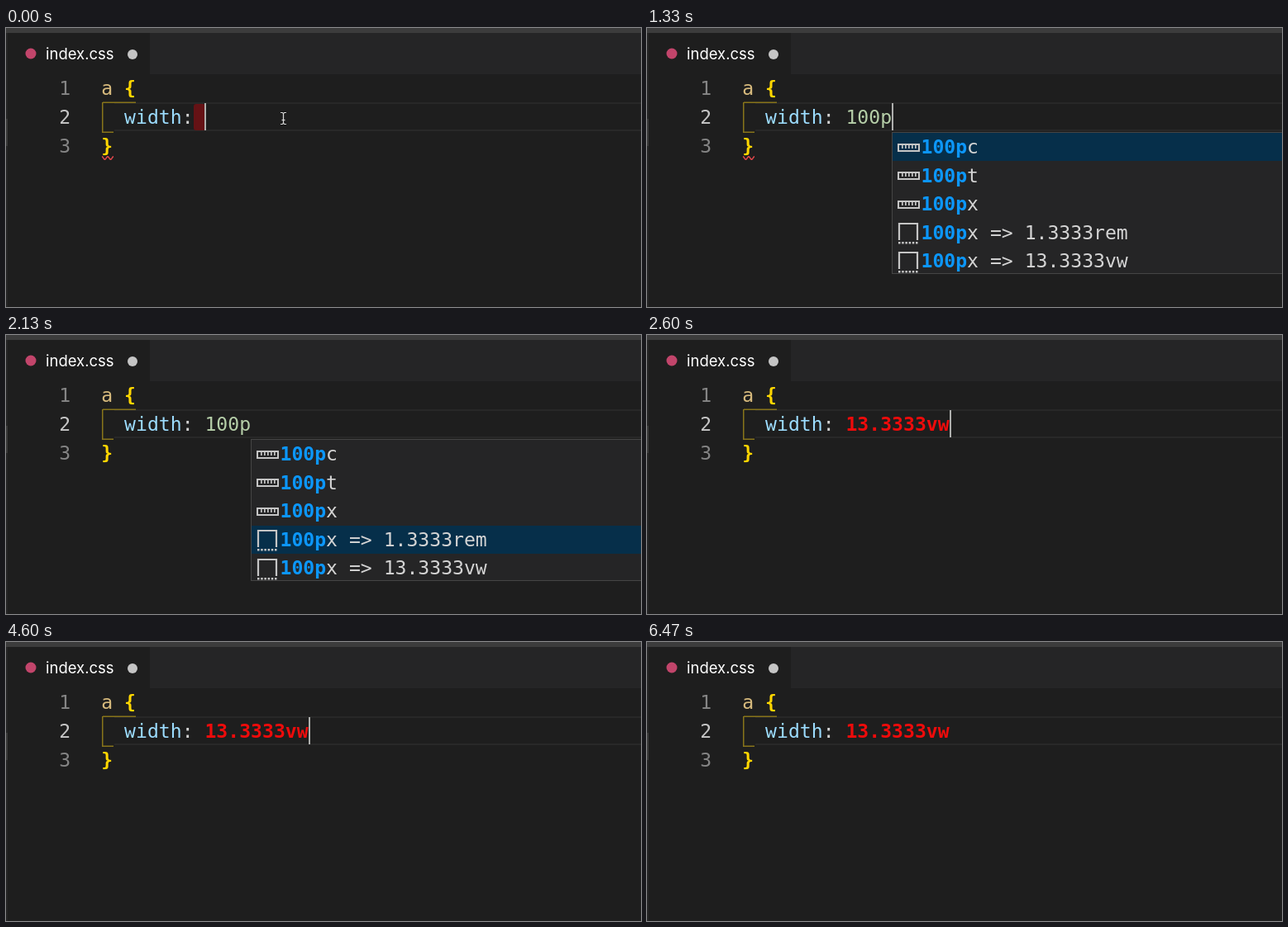
Write an HTML page with a canvas that moves like this. It is 768x338 px and loops after 6790 ms.

```html
<!DOCTYPE html>
<html lang="en">
<head>
<meta charset="utf-8">
<title>CSS unit completion</title>
<style>
html, body { margin: 0; width: 100%; height: 100%; overflow: hidden; background: #1e1e1e; }
canvas { display: block; }
</style>
</head>
<body>
<canvas id="stage" width="768" height="338"></canvas>
<script>
const LOOP = 6790, LEFT = 115.3, ADVANCE = 13.906;
const MONO = '23.1px "DejaVu Sans Mono", monospace';
const ctx = document.getElementById('stage').getContext('2d');

const col = n => LEFT + n * ADVANCE;
const within = (t, from, to) => t >= from && t < to;
const lerp = (a, b, p) => a + (b - a) * Math.min(1, Math.max(0, p));

function rect(x, y, w, h, color) {
  ctx.fillStyle = color;
  ctx.fillRect(x, y, w, h);
}

function text(str, x, y, color, font = MONO, spacing = 0) {
  ctx.font = font;
  ctx.letterSpacing = spacing + 'px';
  ctx.fillStyle = color;
  ctx.fillText(str, x, y);
}

const bold = (str, x, y, color) => text(str, x, y, color, 'bold ' + MONO);

function disc(x, y, r, color) {
  ctx.fillStyle = color;
  ctx.beginPath();
  ctx.arc(x, y, r, 0, 7);
  ctx.fill();
}

function line(points, color, width) {
  ctx.strokeStyle = color;
  ctx.lineWidth = width;
  ctx.beginPath();
  points.forEach(([x, y]) => ctx.lineTo(x, y));
  ctx.stroke();
}

function panel(x, y, w, h) {
  rect(x, y, w, h, '#454545');
  rect(x + 1, y + 1, w - 2, h - 2, '#252526');
}

function drawFrame() {
  rect(0, 0, 768, 338, '#1e1e1e');
  rect(0, 0, 768, 6, '#3c3c3c');
  rect(174, 6, 594, 50, '#252526');
  rect(0, 6, 2, 332, '#252526');
  rect(0, 110, 2, 33, '#3a3a3a');
  disc(30, 31, 6.5, '#c2456b');
  text('index.css', 48, 38, '#ffffff', '18.5px Inter, sans-serif');
  disc(153, 32, 6, '#c5c5c5');
}

function drawCode(t) {
  rect(131, 90, 637, 2, '#282828');
  rect(131, 123, 637, 2, '#282828');
  if (hovering(t)) rect(143, 91, 223, 33, '#1d2b37');

  ['1', '2', '3'].forEach((n, i) =>
    text(n, 64.3, 81 + i * 35, i === 1 ? '#c6c6c6' : '#858585'));

  const guide = '#87741a';
  rect(116, 90, 1.5, 36, guide);
  rect(117, 89.5, 40, 1.5, guide);
  rect(116, 125.5, 14, 1.5, guide);

  text('a', col(0), 81, '#d7ba7d');
  bold('{', col(2), 81, '#ffd700');
  bold('}', col(0), 151, '#ffd700');
  text('width', col(2), 116, '#9cdcfe');
  text(':', col(7), 116, '#d4d4d4');

  if (t < 1730) {
    const wave = [];
    for (let x = 116; x <= 130; x += 0.5)
      wave.push([x, 157.5 - 1.8 * Math.cos((x - 116) * Math.PI / 3.5)]);
    line(wave, '#e5484d', 1.5);
  }
}

const typedAt = [330, 530, 670, 1330];
const accepted = 2530;
const hovering = t => within(t, 4800, 5730);

function drawValue(t) {
  const count = typedAt.filter(k => t >= k).length;
  const done = t >= accepted;
  if (done) bold('13.3333vw', col(9), 116, '#ee0b0b');
  else if (count) text('100p'.slice(0, count), col(9), 116, '#b5cea8');
  else {
    ctx.fillStyle = '#651215';
    ctx.beginPath();
    ctx.roundRect(227, 92, 14, 32, 3);
    ctx.fill();
  }
  const blinkStart = done ? 2600 : t >= 1330 ? 1330 : 0;
  const lit = t < 1330 || t < blinkStart || (t - blinkStart) % 1000 < 500;
  if (lit) rect(Math.round(col(done ? 18 : 9 + count)), 91, 2, 33, '#aeafad');
}

function rulerIcon(y) {
  ctx.strokeStyle = '#c5c5c5';
  ctx.lineWidth = 2;
  ctx.strokeRect(304, y - 4, 25, 8);
  for (let x = 308; x < 328; x += 4) rect(x, y - 4, 1.7, 5, '#c5c5c5');
}

function snippetIcon(y) {
  line([[305, y + 9], [305, y - 11], [327, y - 11], [327, y + 9]], '#c5c5c5', 2.2);
  for (let x = 304; x < 328; x += 4.2) rect(x, y + 11, 2.5, 2.5, '#c5c5c5');
}

function drawSuggestions(t) {
  if (!within(t, 1330, accepted)) return;
  const selected = [1670, 1870, 2070, 2400].filter(k => t >= k).length;
  panel(296, 126, 480, 172);
  ['c', 't', 'x', 'x => 1.3333rem', 'x => 13.3333vw'].forEach((rest, i) => {
    const top = 127 + i * 34.5;
    if (i === selected) rect(297, Math.round(top), 471, i === 4 ? 32 : 34, '#062f4a');
    (i < 3 ? rulerIcon : snippetIcon)(Math.round(top + 17.5));
    bold('100p', 331.5, Math.round(top + 25), '#0c97fb');
    text(rest, 331.5 + 4 * ADVANCE, Math.round(top + 25), '#d4d4d4');
  });
}

function drawHover(t) {
  if (!hovering(t)) return;
  panel(143, 126, 640, 129);
  rect(144, 172, 624, 1, '#3c3c3d');
  [['100 px', 158],
   ['Specifies the width of the content area, padding area or border area', 205],
   ["(depending on 'box-sizing') of certain boxes.", 239]].forEach(([str, y]) =>
    text(str, 151.5, y, '#cccccc', '22px Inter, sans-serif', -0.9));
}

function drawIBeam() {
  const shape = (color, width) => {
    line([[332, 102.5], [334.5, 102.5], [335.5, 104], [335.5, 115], [334.5, 116.5], [332, 116.5]], color, width);
    line([[339, 102.5], [336.5, 102.5], [335.5, 104], [335.5, 115], [336.5, 116.5], [339, 116.5]], color, width);
    line([[333.5, 111.5], [337.5, 111.5]], color, width);
  };
  shape('#111', 2.5);
  shape('#d8d8d8', 1.2);
}

function drawBusyPointer(t) {
  const x = 285.5, y = lerp(98, 96, (t - 3600) / 300) + lerp(0, 10, (t - 4100) / 300);
  ctx.save();
  ctx.translate(x, y);
  ctx.beginPath();
  [[0, 0], [0, 15], [3.5, 11.7], [6, 17], [8.5, 16], [6.2, 10.8], [11, 10.8]]
    .forEach(([px, py]) => ctx.lineTo(px, py));
  ctx.closePath();
  ctx.fillStyle = '#1a1a1a';
  ctx.fill();
  ctx.strokeStyle = '#d0d0d0';
  ctx.lineWidth = 1.1;
  ctx.stroke();
  ctx.translate(9.5, 23);
  ctx.rotate((t - 4070) / 1000 * Math.PI);
  for (let i = 0; i < 4; i++) {
    ctx.fillStyle = i % 2 ? '#1780e0' : '#63b5fa';
    ctx.beginPath();
    ctx.moveTo(0, 0);
    ctx.arc(0, 0, 9.3, i * Math.PI / 2, (i + 1) * Math.PI / 2);
    ctx.fill();
  }
  ctx.restore();
}

function draw(now) {
  const t = now % LOOP;
  drawFrame();
  drawCode(t);
  drawValue(t);
  drawSuggestions(t);
  drawHover(t);
  if (t < typedAt[0]) drawIBeam();
  if (within(t, 3330, 4600)) drawBusyPointer(t);
}

function tick() {
  draw(performance.now());
  requestAnimationFrame(tick);
}
tick();
</script>
</body>
</html>
```
